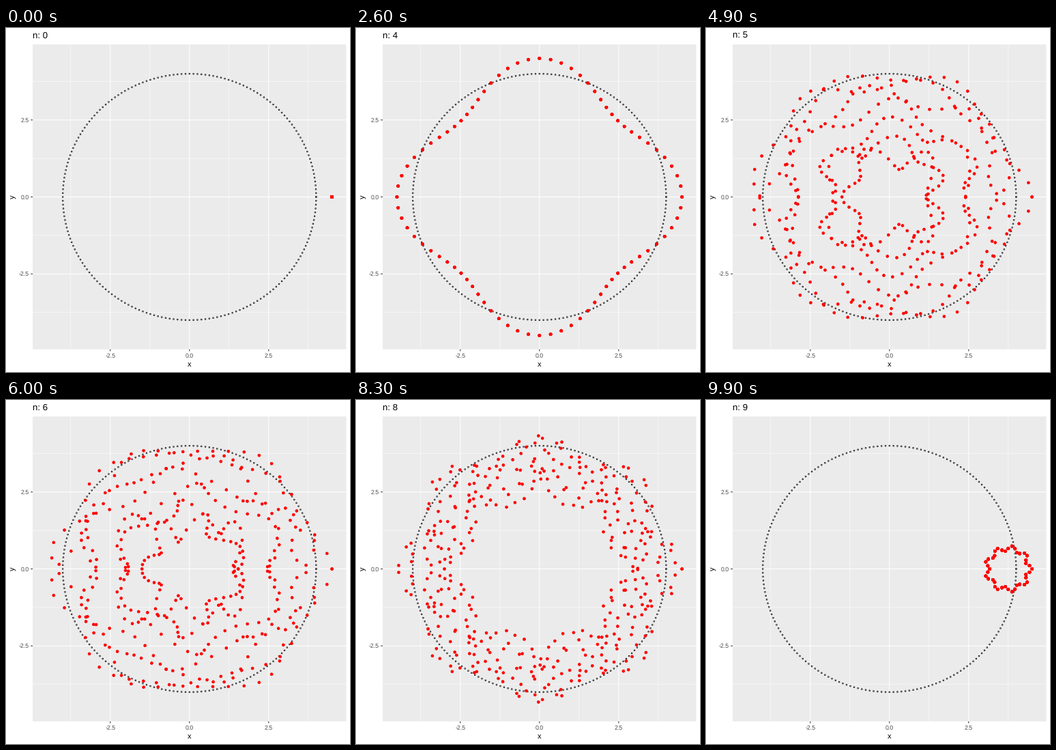
A matplotlib script that plays this animation: 504 by 504 pixels, repeating every 10 s.

```python
import numpy as np
import matplotlib.pyplot as plt
from matplotlib.animation import FuncAnimation

plt.rcParams.update({
    "font.family": "Liberation Sans",
    "text.hinting": "none",
    "path.snap": False,
})

SIZE = 504
LEFT, RIGHT, TOP, BOTTOM = 39.1, 498.5, 24.2, 470.8
LIMIT = 4.95                       # half range of both axes
RADIUS, WAVE = 4.0, 0.5

STATES = [0, 3, 4, 5, 6, 7, 8, 9]
STARTS = [7, 20, 33, 46, 59, 71, 83, 95]   # first moving frame after each state
STEPS = 6
FRAMES, INTERVAL = 100, 100


def px(x):
    return (LEFT + RIGHT) / 2 + np.asarray(x) * (RIGHT - LEFT) / (2 * LIMIT)


def py(y):
    return (TOP + BOTTOM) / 2 - np.asarray(y) * (BOTTOM - TOP) / (2 * LIMIT)


def wave_points(n, count=400):
    """Standing wave with n crests, sampled over n + 1 turns."""
    if n == 0:
        return np.tile([RADIUS + WAVE, 0.0], (count + 1, 1))
    angle = np.linspace(0, 2 * np.pi, count + 1) * (n + 1)
    r = RADIUS + WAVE * np.cos(n * angle)
    return np.column_stack([r * np.cos(angle), r * np.sin(angle)])


def to_pixels(points):
    return np.column_stack([px(points[:, 0]), py(points[:, 1])])


fig = plt.figure(figsize=(SIZE / 72, SIZE / 72), dpi=72, facecolor="white")
ax = fig.add_axes([0, 0, 1, 1])
ax.set_xlim(0, SIZE)
ax.set_ylim(SIZE, 0)
ax.axis("off")


def line(x0, y0, x1, y1, color, width, z):
    ax.plot([x0, x1], [y0, y1], color=color, lw=width, zorder=z,
            solid_capstyle="butt")


def label(x, y, s, size, color="black", **kw):
    return ax.text(x, y, s, fontsize=size, color=color, va="baseline", **kw)


def dots(points, radius, face, edge, z):
    sizes = np.full(len(points), (2 * radius) ** 2)
    return ax.scatter(points[:, 0], points[:, 1], s=sizes, facecolors=face,
                      edgecolors=edge, linewidths=0.709, zorder=z)


def draw_panel():
    ax.add_patch(plt.Rectangle((LEFT, TOP), RIGHT - LEFT, BOTTOM - TOP,
                               fc="#EBEBEB", ec="none", zorder=0))
    for v in (-3.75, -1.25, 1.25, 3.75):
        line(LEFT, py(v), RIGHT, py(v), "white", 0.533, 1)
        line(px(v), TOP, px(v), BOTTOM, "white", 0.533, 1)
    for v in (-2.5, 0.0, 2.5):
        line(LEFT, py(v), RIGHT, py(v), "white", 1.067, 2)
        line(px(v), TOP, px(v), BOTTOM, "white", 1.067, 2)
        line(LEFT - 2.75, py(v), LEFT, py(v), "#333333", 1.067, 2)
        line(px(v), BOTTOM, px(v), BOTTOM + 2.75, "#333333", 1.067, 2)
        label(LEFT - 4.95, py(v) + 3.1, f"{v:.1f}", 8.8, "#4D4D4D", ha="right")
        label(px(v), 482.5, f"{v:.1f}", 8.8, "#4D4D4D", ha="center")
    label(px(0), 496, "x", 11, ha="center")
    label(13.2, py(0), "y", 11, ha="center", rotation=90,
          rotation_mode="anchor")


draw_panel()
turn = np.linspace(0, 2 * np.pi, 201)
ring = RADIUS * np.column_stack([np.cos(turn), np.sin(turn)])
dots(to_pixels(ring), 0.89, "none", "black", 3)

shapes = [to_pixels(wave_points(n)) for n in STATES]
wave = dots(shapes[0], 1.955, "red", "red", 4)
title = label(LEFT, 15, "n: 0", 13.2, ha="left")


def update(i):
    # The title switches one frame after the points have arrived.
    k = sum(i >= start + STEPS for start in STARTS)
    f = min(max((i - STARTS[k] + 1) / STEPS, 0), 1)
    goal = shapes[(k + 1) % len(shapes)]
    wave.set_offsets((1 - f) * shapes[k] + f * goal)
    title.set_text(f"n: {STATES[k]}")
    return wave, title


anim = FuncAnimation(fig, update, frames=FRAMES, interval=INTERVAL, repeat=True)
plt.show()
```
